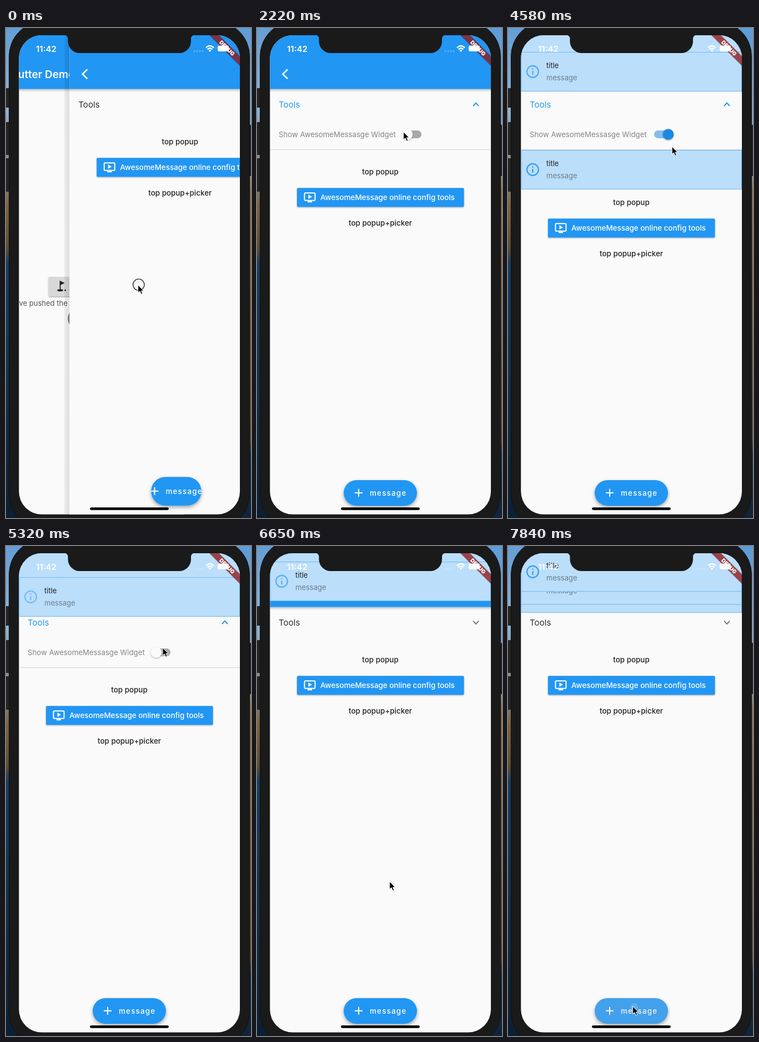
Write an HTML page that moves like this. It is 441 px wide and 880 px high and loops after 7.99 s.

```html
<!DOCTYPE html>
<html lang="en">
<head>
<meta charset="utf-8">
<title>Message popup demo</title>
<style>
  html, body { margin: 0; width: 100%; height: 100%; overflow: hidden; background: #1a1a1a; }
  svg { display: block; width: 100%; height: 100%; }
  text { font-family: Inter, Roboto, sans-serif; }
  .mid { text-anchor: middle; }
  .strong { font-size: 13.4px; font-weight: 450; }
  .line { fill: none; stroke: #fff; stroke-width: 2; }
</style>
</head>
<body>
<svg viewBox="0 0 441 880">
  <defs>
    <linearGradient id="leftView" x2="0" y2="1">
      <stop offset="0" stop-color="#649ed4"/><stop offset=".16" stop-color="#8db6d8"/>
      <stop offset=".33" stop-color="#7c766b"/><stop offset=".36" stop-color="#80643e"/>
      <stop offset=".45" stop-color="#5f4c32"/><stop offset=".48" stop-color="#173f63"/>
      <stop offset="1" stop-color="#0b1f33"/>
    </linearGradient>
    <linearGradient id="rightView" x2="0" y2="1">
      <stop offset="0" stop-color="#5e9cd6"/><stop offset=".28" stop-color="#8db0cc"/>
      <stop offset=".33" stop-color="#8f7145"/><stop offset=".84" stop-color="#5c4a30"/>
      <stop offset=".87" stop-color="#18344f"/><stop offset="1" stop-color="#102338"/>
    </linearGradient>
    <linearGradient id="barShade" x2="0" y2="1">
      <stop offset="0" stop-color="#000" stop-opacity=".24"/><stop offset="1" stop-color="#000" stop-opacity="0"/>
    </linearGradient>
    <linearGradient id="edgeShade">
      <stop offset="0" stop-color="#000" stop-opacity=".06"/><stop offset="1" stop-color="#000" stop-opacity=".12"/>
    </linearGradient>
    <filter id="lift" x="-30%" y="-50%" width="160%" height="220%">
      <feDropShadow dx="0" dy="3" stdDeviation="3" flood-opacity=".35"/>
    </filter>
    <filter id="lowLift" x="-10%" y="-30%" width="120%" height="180%">
      <feDropShadow dx="0" dy="1" stdDeviation="1" flood-opacity=".4"/>
    </filter>
    <clipPath id="screen"><rect x="23.3" y="13" width="397.7" height="860.5" rx="41"/></clipPath>
    <clipPath id="tileClip"><rect id="tileWindow" x="23" y="164" width="399"/></clipPath>
    <clipPath id="fabClip"><rect id="fabWindow"/></clipPath>
    <g id="appBar">
      <rect x="23" y="13" width="399" height="861" fill="#fafafa"/>
      <rect x="23" y="109" width="399" height="6" fill="url(#barShade)"/>
      <rect x="23" y="13" width="399" height="96.5" fill="#2196f3"/>
    </g>
  </defs>

  <rect width="220" height="880" fill="url(#leftView)"/>
  <rect x="220" width="221" height="880" fill="url(#rightView)"/>
  <path d="M0 108h8v35H0zM0 169h8v59H0zM0 234h8v60H0zM436 174h5v92h-5z" fill="#242424"/>
  <rect x="5.5" y="-12" width="433" height="912" rx="63" fill="#1a1a1a" stroke="#101010"/>

  <g clip-path="url(#screen)">
    <g id="homePage">
      <use href="#appBar"/>
      <text class="mid" x="222" y="90" font-size="19" font-weight="600" fill="#fff">Flutter Demo Home Page</text>
      <rect x="179" y="447" width="86" height="35" rx="2" fill="#d8d8d8" filter="url(#lowLift)"/>
      <path d="M200 455v16M200 455l6 3-6 3z" fill="#222" stroke="#222" stroke-width="1.8"/>
      <ellipse cx="200" cy="471" rx="5.5" ry="2" fill="#222"/>
      <circle cx="209" cy="471" r="1.5" fill="#222"/>
      <text class="mid" x="222" y="499" font-size="13" fill="#555">You have pushed the button this many times:</text>
      <text class="mid" x="222" y="534" font-size="32" fill="#757575">0</text>
    </g>

    <g id="toolsPage">
      <rect id="pageEdge" x="14" y="13" width="9.5" height="861" fill="url(#edgeShade)"/>
      <use href="#appBar"/>
      <path class="line" d="M55 74.5l-8.5 8.3 8.5 8.3" style="stroke-width:2.7"/>
      <text id="tools" x="39" y="142.5" font-size="15" letter-spacing=".1">Tools</text>
      <path id="chevron" d="M-5-2.7L0 2.7 5-2.7" fill="none" stroke-width="2"/>
      <g clip-path="url(#tileClip)">
        <g id="tile">
          <text x="39" y="195.5" font-size="13.2" fill="#858585">Show AwesomeMessasge Widget</text>
          <rect id="track" x="263" y="184" width="33" height="14" rx="7"/>
          <circle id="thumb" cy="191" r="9.8" filter="url(#lowLift)"/>
        </g>
      </g>
      <path id="divider" d="M23 0h399" stroke="#d5d5d5"/>
      <g id="inlineCard" transform="translate(0 219)"></g>
      <g id="rest" fill="#212121">
        <text class="mid strong" x="222" y="208.5">top popup</text>
        <rect x="72" y="233.2" width="300.5" height="34" rx="2" fill="#2196f3" filter="url(#lowLift)"/>
        <rect class="line" x="85.5" y="242.3" width="19" height="13.5" rx="1.5"/>
        <path d="M92.5 245v8l6.500-4zM91 256.800h8v2.400h-8z" fill="#fff"/>
        <text x="114" y="254.700" font-size="13.4" font-weight="500" fill="#fff">AwesomeMessage online config tools</text>
        <text class="mid strong" x="222" y="300.600">top popup+picker</text>
      </g>
    </g>

    <rect id="fab" fill="#2196f3" filter="url(#lift)"/>
    <g clip-path="url(#fabClip)">
      <g id="fabContent">
        <path class="line" d="M-46-.3h14M-39-7.3v14"/>
        <text x="-19" y="4.7" font-size="13.4" font-weight="500" letter-spacing="1.2" fill="#fff">message</text>
      </g>
      <g id="press">
        <rect x="150" y="805" width="150" height="60" fill="#c8c8c8" opacity=".2"/>
        <circle cx="227" cy="828" r="7" fill="#fff" opacity=".16"/>
      </g>
    </g>

    <g id="popups"></g>

    <g transform="translate(421 13) rotate(45)">
      <rect x="-60" y="26.4" width="120" height="12.6" opacity=".4"/>
      <rect x="-60" y="26.9" width="120" height="11.5" fill="#b71c1c" opacity=".63"/>
      <text class="mid" y="36.2" font-size="9.8" font-weight="900" fill="#fff">DEBUG</text>
    </g>
    <g fill="#fff">
      <text x="54" y="42.5" font-size="15" font-weight="600">11:42</text>
      <path d="M339 41.5h17" stroke="#fff" stroke-width="3.4" stroke-linecap="round" stroke-dasharray="0 5" opacity=".25"/>
      <path class="line" d="M360 35.5q7-7 14 0M362.6 38.4q4.4-4.4 8.8 0" style="stroke-width:2.4"/>
      <path d="M364.6 40.3q2.400-2 4.800 0l-2.400 2.700z"/>
      <rect x="381" y="31.5" width="20" height="10.5" rx="3"/>
      <path d="M402 35q2 1.700 0 3.500z"/>
    </g>
  </g>

  <path d="M105 12.5a6.500 6.500 0 0 1 6.500 6.500v5a21 21 0 0 0 21 21h179.500a21 21 0 0 0 21-21v-5a6.500 6.500 0 0 1 6.500-6.500z" fill="#1a1a1a"/>
  <path d="M153.500 863.300h137" stroke="#000" stroke-width="4.800" stroke-linecap="round"/>

  <g id="cursor">
    <circle id="ring" cx="1.800" r="10.200" fill="none" stroke="#000" stroke-width="1.100"/>
    <path transform="translate(.6 .6)" d="M0 0v14l3.300-3 2.400 5.500 2.500-1-2.300-5.200h4.300z" stroke="#fff"/>
  </g>
</svg>

<script>
const LOOP = 7990;
const STEP = 148;
const LAST_STEP = 53;
const $ = id => document.getElementById(id);
const clamp = v => Math.max(0, Math.min(1, v));
const mix = (a, b, p) => a + (b - a) * p;
const smooth = p => p * p * (3 - 2 * p);
const progress = (t, start, duration) => clamp((t - start) / duration);
const between = (t, [from, to]) => t >= from && t < to;
const set = (node, attrs) => { for (const k in attrs) node.setAttribute(k, attrs[k]); };
const show = (node, on) => set(node, { visibility: on ? 'visible' : 'hidden' });
const blend = (a, b, p) => `rgb(${a.map((v, i) => Math.round(mix(v, b[i], p)))})`;

const BLUE = [33, 150, 243];
const HOME_EXIT = -133;
const SLIDE = { start: -133, duration: 400 };
const WIDGET = [2340, 5000];
const PULSE_DELAY = 250;
const POPUPS = [
  { start: 3850, exit: 6280 },
  { start: 7038, exit: Infinity },
  { start: 7179, exit: Infinity },
  { start: 7320, exit: Infinity }
];
const CLICKS = [[0, 140], [1380, 1480], [2300, 2400], [3760, 3860], [4950, 5050],
  [6020, 6140], [7000, 7060], [7150, 7200], [7290, 7340]];
const PRESSES = [[3780, 4000], [7010, LOOP]];
// time, x, y of the pointer tip
const PATH = [[0, 237, 461], [300, 237, 461], [1100, 262, 147], [1500, 262, 147], [2000, 263, 186],
  [3000, 263, 186], [3690, 185, 832], [3950, 185, 832], [4580, 295, 213], [4880, 278, 188],
  [5250, 278, 188], [5800, 302, 147], [6200, 302, 147], [6660, 238, 602], [7000, 224, 826],
  [LOOP, 224, 826]];

function bezier(x1, y1, x2, y2) {
  const at = (a, b, s) => 3 * (1 - s) * s * ((1 - s) * a + s * b) + s ** 3;
  return x => {
    let low = 0, high = 1;
    for (let i = 0; i < 22; i++) {
      const s = (low + high) / 2;
      if (at(x1, x2, s) < x) low = s; else high = s;
    }
    return at(y1, y2, low);
  };
}
const pageEase = bezier(.35, .91, .33, .97);
const heroEase = bezier(.4, 0, .2, 1);
const circOut = p => Math.sqrt(1 - (1 - p) ** 2);

const card = `
  <rect x="24" y=".5" width="396.5" height="70" fill="#bbdefb" stroke="#72b8f2"/>
  <g class="icon" fill="none" stroke="#2196f3" stroke-width="2.2">
    <circle cx="44.5" cy="35.3" r="10.4"/>
    <path d="M44.5 34v7M44.5 29.5v2.3"/>
  </g>
  <text x="69" y="28.6" font-size="13" fill="#222">title</text>
  <text x="69" y="50.6" font-size="13" fill="#6b7d8c">message</text>`;
$('inlineCard').innerHTML = card;
$('popups').innerHTML = POPUPS.map(() =>
  `<g><rect x="23" y="-70" width="399" height="140" fill="#bbdefb"/>${card}</g>`).join('');

function pulse(node, age) {
  const phase = Math.max(0, age) / 1000 % 2;
  set(node.querySelector('.icon'), { opacity: mix(1, .4, smooth(phase < 1 ? phase : 2 - phase)) });
}

function drawPages(t) {
  const p = progress(t, SLIDE.start, SLIDE.duration);
  const slide = pageEase(p), hero = heroEase(p);
  set($('homePage'), { transform: `translate(${HOME_EXIT * slide} 0)` });
  set($('toolsPage'), { transform: `translate(${p < 1 ? 397.5 * (1 - slide) : 0} 0)` });
  show($('homePage'), p < 1);
  show($('pageEdge'), p < 1);

  const width = mix(56, 132, hero), height = mix(56, 46, hero);
  const x = mix(377, 222, hero), y = mix(829.5, 835, hero);
  const box = { x: x - width / 2, y: y - height / 2, width, height, rx: height / 2 };
  set($('fab'), box);
  set($('fabWindow'), box);
  set($('fabContent'), { transform: `translate(${x} ${y})` });
  show($('press'), PRESSES.some(span => between(t, span)));
}

function drawTools(t) {
  const open = smooth(progress(t, 1420, 200) - progress(t, 6090, 200));
  const on = smooth(progress(t, 2320, 180) - progress(t, 4980, 180));
  const hasWidget = between(t, WIDGET);

  set($('tools'), { fill: blend([45, 45, 45], BLUE, open) });
  set($('chevron'), {
    transform: `translate(394 137.3) rotate(${-180 * open})`,
    stroke: blend([120, 120, 120], BLUE, open)
  });
  set($('tileWindow'), { height: 54 * open });
  set($('tile'), { transform: `translate(0 ${27 * (open - 1)})` });
  set($('divider'), { transform: `translate(0 ${164.5 + 54 * open})`, opacity: open });
  set($('track'), { fill: blend([168, 168, 168], [134, 188, 237], on) });
  set($('thumb'), { cx: mix(270.5, 288.5, on), fill: blend([250, 250, 250], [30, 136, 229], on) });
  set($('rest'), { transform: `translate(0 ${54 * open + (hasWidget ? 55 : 0)})` });
  show($('inlineCard'), hasWidget);
  pulse($('inlineCard'), t - WIDGET[0]);
}

function drawPopups(t) {
  POPUPS.forEach(({ start, exit }, i) => {
    const node = $('popups').children[i];
    const shown = circOut(progress(t, start, 1000) - progress(t, exit, 1000));
    set(node, { transform: `translate(0 ${56 - 373 * (1 - shown)})` });
    pulse(node, t - start - PULSE_DELAY);
  });
}

function drawCursor(t) {
  const next = PATH.findIndex(point => point[0] > t);
  const [t0, x0, y0] = PATH[next - 1], [t1, x1, y1] = PATH[next];
  const p = progress(t, t0, t1 - t0);
  set($('cursor'), { transform: `translate(${mix(x0, x1, p)} ${mix(y0, y1, p)})` });
  show($('ring'), CLICKS.some(span => between(t, span)));
}

function frame() {
  const elapsed = performance.now() % LOOP;
  const t = STEP * Math.min(LAST_STEP, Math.floor(elapsed / STEP + .1));
  drawPages(t);
  drawTools(t);
  drawPopups(t);
  drawCursor(t);
  requestAnimationFrame(frame);
}
frame();
</script>
</body>
</html>
```
